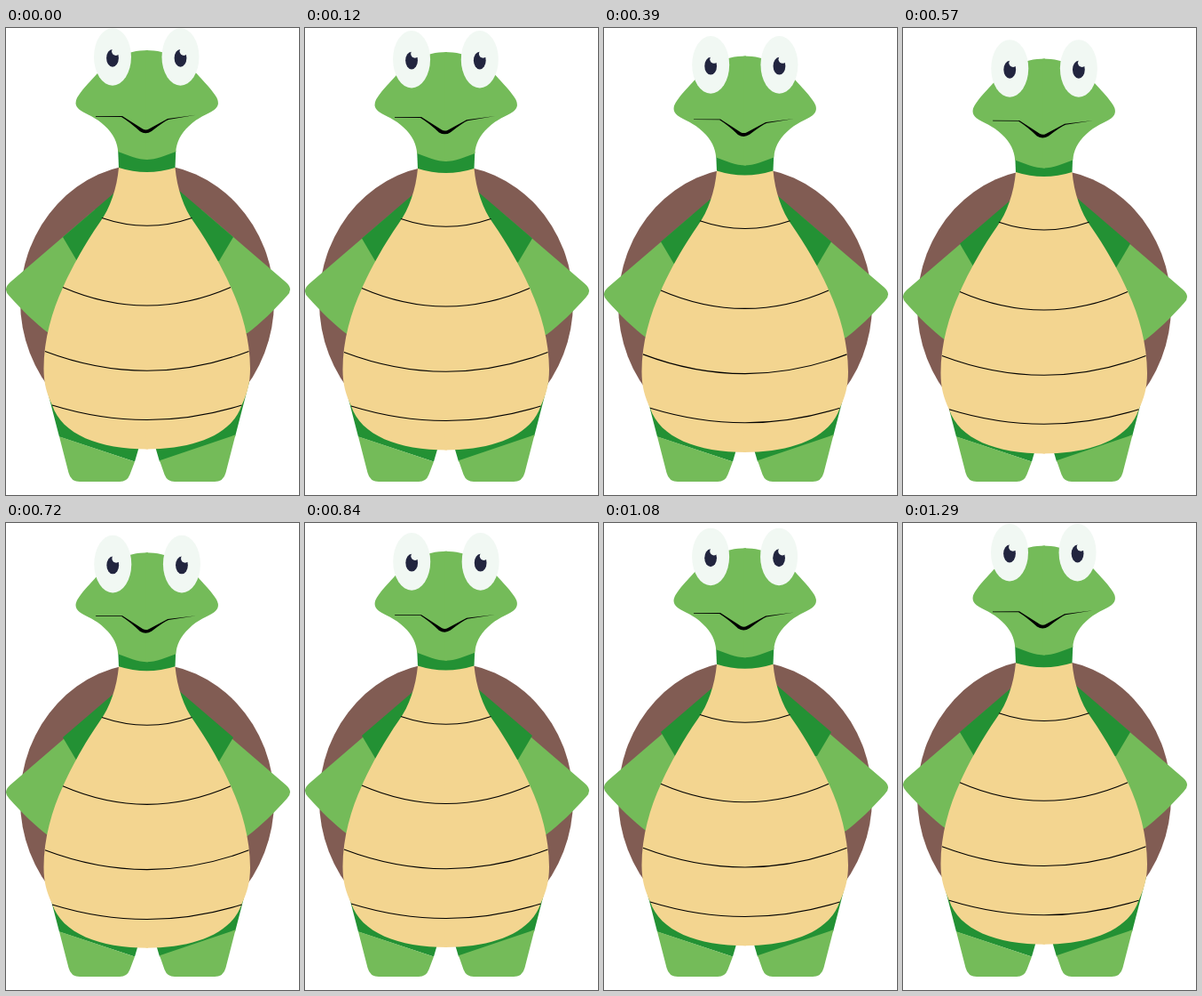
An HTML page that plays this animation: 330 px wide and 525 px high, repeating every 1320 ms.

```html
<!DOCTYPE html>
<html>
<head>
<meta charset="utf-8">
<title>Breathing turtle</title>
<style>
  html, body { margin: 0; width: 100%; height: 100%; overflow: hidden; background: #fff; }
  svg { display: block; width: 330px; height: 525px; }
  .light { fill: #74bb59; }
  .dark { fill: #239134; }
  .belly { fill: #f3d590; }
  .lines { fill: none; stroke: #000; stroke-width: 1.1; }
</style>
</head>
<body>
<svg viewBox="0 0 330 525">
  <defs>
    <path id="upperArm" class="dark" d="M130 178.5L64 235L80 262L130 262Z"/>
    <path id="forearm" class="light" d="M100 204.2L4.5 286Q-4 293.5 3.5 301C18 317 33 332 48 343L90 350L100 296Z"/>
    <path id="thigh" class="dark" d="M44 398L60 459.5L145 487.5L151 467L100 440Z"/>
    <path id="halfBody" class="belly" d="M160 157H127C125 180 117 203 106 218C85 248 70 278 64 292C52 318 42.5 350 42.5 383C42.5 400 46 411 52 424C63 457 105 473.5 160 473.5Z"/>
    <path id="halfHead" class="light" d="M160 25C135 25 116 36 102.5 51.5C94.5 60.5 88 66.5 82.3 75Q74.5 85.5 83 92C91 97.5 101 100 111.5 110.3C121 119 125.5 129 126.2 139C137 143 148 148 160 148Z"/>
    <g id="eye">
      <ellipse cy="32.5" rx="21" ry="32.3" fill="#f1f8f3"/>
      <ellipse cy="33.8" rx="6.9" ry="9.9" fill="#22253f"/>
      <circle cx="3.8" cy="26.3" r="4.7" fill="#f1f8f3"/>
    </g>
  </defs>

  <ellipse id="shell" cx="159" cy="306.7" rx="143" ry="153.9" fill="#815c53"/>
  <g id="forearms">
    <use href="#forearm"/>
    <use href="#forearm" transform="matrix(-1 0 0 1 320 0)"/>
  </g>
  <g id="upperArms">
    <use href="#upperArm"/>
    <use href="#upperArm" transform="matrix(-1 0 0 1 320 0)"/>
  </g>
  <use href="#thigh"/>
  <use href="#thigh" transform="matrix(-1 0 0 1 318 0)"/>
  <path class="light" d="M60 459.3L145 487.5L139.5 502Q136.5 510 128 510H83Q73 510 70.5 500Z"/>
  <path class="light" d="M258.5 457.3L173 486.3L178.5 502Q181.5 510 190 510H235Q245 510 247.5 500Z"/>
  <g id="body">
    <use href="#halfBody"/>
    <use href="#halfBody" transform="matrix(-1 0 0 1 317.5 0)"/>
    <path class="lines" d="M64 291.5Q159 332.5 253 291.5M44 363.5Q159 407 273.5 363.5"/>
    <path class="dark" d="M126.2 138L127 157Q158.5 167 190.5 157L191.3 138Z"/>
  </g>
  <path id="outerLines" class="lines" d="M108 213.5Q159 231 209.5 213.5M52 424Q159 457 265.5 424"/>
  <g id="head">
    <use href="#halfHead"/>
    <use href="#halfHead" transform="matrix(-1 0 0 1 317.5 0)"/>
  </g>
  <path id="mouth" d="M101 99.3L131 99L154 113.5Q157.5 115.3 161 113.5L182 102L214 97.8L183 103Q178 105 164 116Q157.5 120.3 151 116.3Q140 106 130 99.9L101 100Z"/>
  <use id="leftEye" href="#eye"/>
  <use id="rightEye" href="#eye"/>
</svg>
<script>
const LOOP = 1320;
const $ = id => document.getElementById(id);
const move = (id, x, y, angle = 0) =>
  $(id).setAttribute("transform", `translate(${x} ${y}) rotate(${angle} 157 108)`);

// Linear rise to 1 at the peak time, then linear fall to 0 at the end time.
const sway = (t, peak, end = LOOP) =>
  t < peak ? t / peak : Math.max(0, (end - t) / (end - peak));

function draw(now) {
  const t = now % LOOP;
  const early = sway(t, 600), late = sway(t, 660);
  move("shell", 0, 6 * early);
  move("forearms", 0, 9.5 * late);
  move("upperArms", 0, 8 * sway(t, 600, 1080));
  move("body", 0, 5.2 * early);
  move("outerLines", 0, 5.5 * late);
  move("head", 0, 10 * early);
  move("mouth", 0, 6.2 * late, late);
  move("leftEye", 120 + 0.3 * late, 15 * late);
  move("rightEye", 196.5 + 1.6 * late, 15 * late);
}

let start;
function tick(now) {
  start ??= now;
  draw(now - start);
  requestAnimationFrame(tick);
}
draw(0);
requestAnimationFrame(tick);
</script>
</body>
</html>
```
